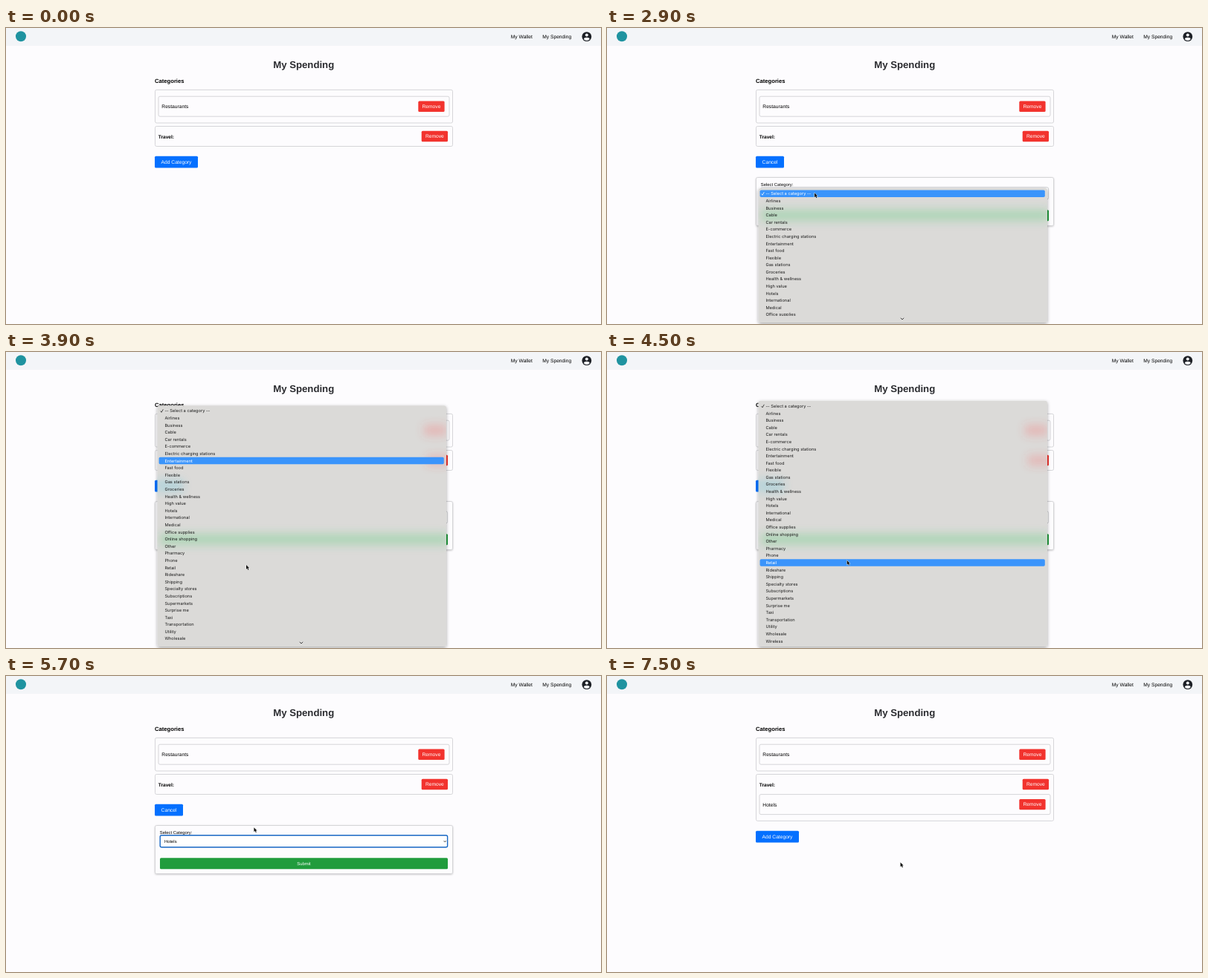
Write an HTML page that moves like this. It is 800 by 399 pixels and loops after 8 s.

```html
<!DOCTYPE html>
<html lang="en">
<head>
<meta charset="utf-8">
<title>My Spending</title>
<style>
  html, body { margin: 0; width: 100%; height: 100%; overflow: hidden; background: #fdfcfe; }
  svg { display: block; width: 100%; height: 100%; }
  text { font-family: "Liberation Sans", Arial, sans-serif; text-rendering: geometricPrecision; white-space: pre; }
  .menu text { font-family: Inter, Roboto, sans-serif; }
</style>
</head>
<body>
<svg id="stage" viewBox="0 0 800 399" preserveAspectRatio="none"></svg>
<script>
const LOOP = 8000, ROW = 9.597, MENU_BOTTOM = 397, FIRST_ROW = 218.5, MAX_SCROLL = 150.4;
const FORM_OPEN = 1700, MENU_OPEN = 2900, SCROLL_START = 3500, SCROLL_END = 4200,
      HOVER_AGAIN = 4400, PICK = 5300, MENU_CLOSE = 5500, SUBMIT = 7100;

const options = ['-- Select a category --', 'Airlines', 'Business', 'Cable', 'Car rentals', 'E-commerce',
  'Electric charging stations', 'Entertainment', 'Fast food', 'Flexible', 'Gas stations', 'Groceries',
  'Health &amp; wellness', 'High value', 'Hotels', 'International', 'Medical', 'Office supplies',
  'Online shopping', 'Other', 'Pharmacy', 'Phone', 'Retail', 'Rideshare', 'Shipping', 'Specialty stores',
  'Subscriptions', 'Supermarkets', 'Surprise me', 'Taxi', 'Transportation', 'Utility', 'Wholesale', 'Wireless'];

// Pointer tip: time, x, y
const pointerPath = [[800, 262, 168], [1100, 245, 176.5], [1700, 245, 176.5], [2450, 279, 222.3],
  [2900, 279, 222.3], [3400, 323, 287], [4400, 323, 287], [5000, 318, 205.2], [5500, 318, 205.2],
  [6200, 395, 200], [6300, 395, 200], [7000, 394.5, 251.3], [8000, 394.5, 251.3]];

const clamp = v => Math.min(1, Math.max(0, v));
const progress = (t, from, to) => clamp((t - from) / (to - from));
const smooth = u => u * u * (3 - 2 * u);

const rect = (x, y, x2, y2, attrs, r = 1.5) =>
  `<rect x="${x}" y="${y}" width="${x2 - x}" height="${y2 - y}" rx="${r}" ${attrs}/>`;
const label = (x, y, text, size = 6.7, attrs = '') =>
  `<text x="${x}" y="${y + size * 0.355}" font-size="${size}" ${attrs}>${text}</text>`;
const box = (x, y, x2, y2) => rect(x, y, x2, y2, 'fill="#fdfcfe" stroke="#ccccd0" stroke-width=".8"', 2);
const button = (x, y, x2, y2, text, color, size) =>
  rect(x, y, x2, y2, `fill="${color}"`) +
  label((x + x2) / 2, (y + y2) / 2, text, size, 'fill="#fff" text-anchor="middle"');
const removeButton = (x, y) => button(x, y, x + 35.3, y + 14.4, 'Remove', '#f2332e');
const entry = (y, text) => box(205, y, 596, y + 27) + label(209.3, y + 13.8, text) + removeButton(554.3, y + 6.3);

function pointerAt(t) {
  const i = Math.max(1, pointerPath.findIndex(p => p[0] > t));
  const [a, b] = [pointerPath[i - 1], pointerPath[i]];
  const u = smooth(progress(t, a[0], b[0]));
  return { x: a[1] + (b[1] - a[1]) * u, y: a[2] + (b[2] - a[2]) * u };
}

const defs = `<defs>
  <filter id="glow" x="-50%" y="-200%" width="200%" height="500%"><feGaussianBlur stdDeviation="6"/></filter>
  <filter id="shade" x="-10%" y="-10%" width="120%" height="125%">
    <feDropShadow dx="0" dy="1.5" stdDeviation="2.2" flood-opacity=".35"/></filter>
  <filter id="lift" x="-5%" y="-10%" width="110%" height="125%">
    <feDropShadow dx="0" dy=".8" stdDeviation=".9" flood-opacity=".22"/></filter></defs>`;

const header = rect(0, 0, 800, 399, 'fill="#fdfcfe"', 0) + rect(0, 0, 800, 24, 'fill="#f3f5f8"', 0) +
  '<circle cx="20" cy="11.2" r="7" fill="#1f93a0"/>' +
  label(678.8, 12, 'My Wallet') + label(721.2, 12, 'My Spending') +
  `<circle cx="780.8" cy="11.6" r="6.4" fill="#1d2026"/>
   <circle cx="780.8" cy="9.5" r="2" fill="#f3f5f8"/>
   <path d="M776.9 15.2q.2-2.4 3.9-2.4t3.9 2.4q-1.5 1.7-3.9 1.7t-3.9-1.7z" fill="#f3f5f8"/>` +
  label(400.2, 49.4, 'My Spending', 13.2, 'font-weight="700" fill="#2b2c30" text-anchor="middle"') +
  label(200, 70.8, 'Categories', 7.65, 'font-weight="700"');

function page(t, pointer) {
  const done = t >= SUBMIT, form = t >= FORM_OPEN && !done;
  const addY = done ? 208.8 : 172.8;
  const hot = t >= 800 && t < FORM_OPEN && overAdd(pointer);
  return box(200.5, 83.4, 600.5, 128) + entry(92.2, 'Restaurants') +
    box(200.5, 132.5, 600.5, done ? 195.3 : 159.5) +
    label(204.8, 146.5, 'Travel:', 6.6, 'font-weight="700"') + removeButton(558.7, 138.8) +
    (done ? entry(159.6, 'Hotels') : '') +
    (form ? button(200, 172.8, 238, 188.6, 'Cancel', '#0470ff') + categoryForm(t, pointer)
          : button(200, addY, 258, addY + 15.8, 'Add Category', hot ? '#0052b4' : '#0470ff'));
}

const overAdd = p => p.x > 200 && p.x < 258 && p.y > 172 && p.y < 189;
const overSubmit = p => p.y > 245 && p.y < 260;

function categoryForm(t, pointer) {
  const picked = t >= MENU_CLOSE;
  const border = picked ? 'stroke="#1767c4" stroke-width="1.4"' : 'stroke="#c4c4c8" stroke-width=".8"';
  return `<g filter="url(#lift)">${box(200.5, 201.5, 600.5, 266.5)}</g>` +
    label(206.8, 211.2, 'Select Category:', 5.9) +
    rect(207.2, 214.8, 593.6, 230.8, 'fill="#fff" ' + border, 2) +
    label(213, 222.9, picked ? 'Hotels' : options[0], 5.85) +
    '<path d="M588.7 222.1l1.5 1.6 1.5-1.6" fill="none" stroke="#222" stroke-width=".9"/>' +
    button(207, 245.2, 594, 260.2, 'Submit', picked && overSubmit(pointer) ? '#1d8535' : '#219c3d', 5.95);
}

function menu(t, pointer) {
  if (t < MENU_OPEN || t >= MENU_CLOSE + 150) return '';
  const scroll = MAX_SCROLL * (1 - (1 - progress(t, SCROLL_START, SCROLL_END)) ** 3.7);
  const top = FIRST_ROW - scroll, more = scroll < MAX_SCROLL - 0.5;
  // The highlight stays with its row until the pointer moves again.
  const hoverTop = t < HOVER_AGAIN ? FIRST_ROW : top;
  const blink = t >= PICK && t < PICK + 100;
  const active = blink ? -1 : t >= PICK ? 14 : Math.max(0, Math.floor((pointer.y - hoverTop) / ROW));
  const frame = attrs => rect(203.6, top - 2.4, 592, MENU_BOTTOM, attrs, 3);
  const ink = i => `fill="${i === active ? '#fff' : '#1c1c1c'}"`;
  const rows = options.map((text, i) => {
    const y = top + i * ROW;
    return y > 388 ? '' :
      (i === active ? rect(205.6, y, 588.8, y + ROW, 'fill="#3a94fb"', 1.8) : '') +
      label(213.4, y + ROW / 2, text, 5.7, ink(i));
  }).join('');
  return `<clipPath id="inside">${frame('')}</clipPath>
    <clipPath id="list">${rect(203, 0, 593, more ? 388 : 397, '', 0)}</clipPath>
    <g class="menu" opacity="${1 - progress(t, MENU_CLOSE, MENU_CLOSE + 150)}">
      ${frame('fill="#dbdad8" filter="url(#shade)"')}
      <g clip-path="url(#inside)"><g filter="url(#glow)">
        ${rect(207, 245, 594, 260, 'fill="#40cc60" opacity=".27"')}
        ${rect(562, 98, 592, 113, 'fill="#ff5050" opacity=".24"')}
        ${rect(566, 139, 596, 153, 'fill="#ff5050" opacity=".24"')}
        ${rect(200, 173, 238, 188, 'fill="#30c0e0" opacity=".24"')}
      </g></g>
      <g clip-path="url(#list)">${rows}
        <path d="M207.7 ${top + 5}l1.3 1.7 2.3-4" fill="none" stroke="${active === 0 ? '#fff' : '#1c1c1c'}" stroke-width=".8"/>
      </g>
      ${more ? '<path d="M394.8 390.8l2.2 2.2 2.2-2.2" fill="none" stroke="#333" stroke-width=".9"/>' : ''}
    </g>`;
}

function cursor(t, p) {
  if (t < 800) return '';
  const hand = t < FORM_OPEN ? overAdd(p) : t >= MENU_CLOSE && t < SUBMIT && overSubmit(p);
  const shape = hand
    ? 'M-.7.6q.7-1.1 1.3 0l.2 2.6 2.3.6q.9.4.7 1.5l-.6 2.7h-3.2l-2-2.8q-.5-1 .4-1l1 .7z'
    : 'M0 0v5.9l1.4-1.3 1 2.3 1-.4-1-2.2h1.8z';
  return `<path transform="translate(${p.x} ${p.y})" d="${shape}" fill="#111" stroke="#fff"
    stroke-width=".9" stroke-linejoin="round" paint-order="stroke"/>`;
}

const stage = document.getElementById('stage');
function draw(now) {
  const t = now % LOOP, pointer = pointerAt(t);
  stage.innerHTML = defs + header + page(t, pointer) + menu(t, pointer) + cursor(t, pointer);
  requestAnimationFrame(draw);
}
draw(performance.now());
</script>
</body>
</html>
```
